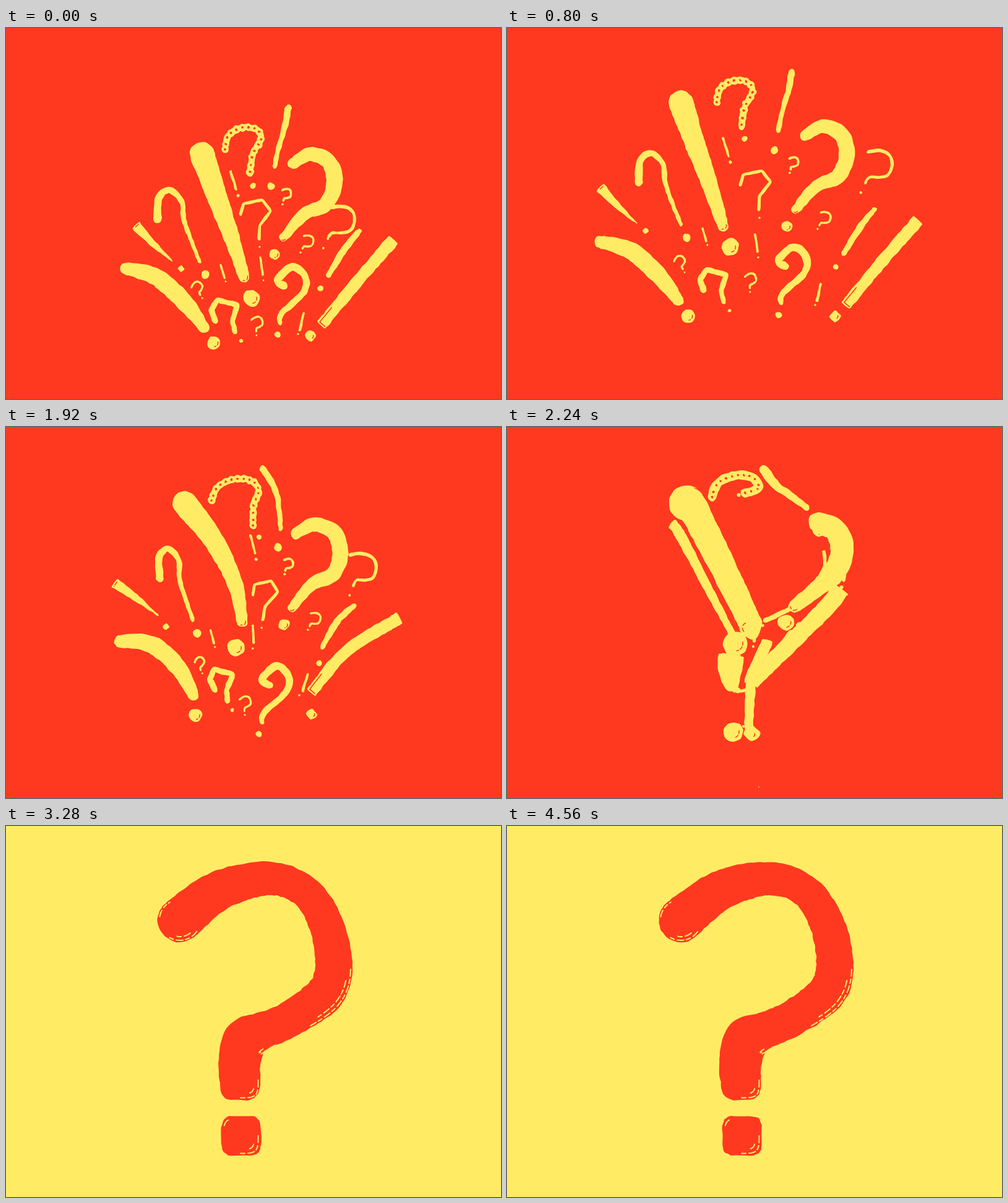
These frames come from a looping animation (800x600 px, 4640 ms). An HTML page with a canvas:

```html
<!DOCTYPE html>
<html lang="en">
<head>
<meta charset="utf-8">
<title>Questions</title>
<style>
html, body { margin: 0; width: 100%; height: 100%; overflow: hidden; background: #ff3920; }
canvas { display: block; width: 100vw; height: 100vh; }
</style>
</head>
<body>
<canvas id="stage" width="800" height="600"></canvas>
<script>
const RED = '#ff3920', YELLOW = '#ffec64';
const LOOP = 4640, STEP = 80, POP = 2320, H = Math.PI / 2;
const ctx = document.getElementById('stage').getContext('2d');
ctx.lineCap = ctx.lineJoin = 'round';

const parse = s => s.split(' ').map(p => p.split(',').map(Number));
const mix = (a, b, k) => a + (b - a) * k;
const clamp = (v, lo, hi) => Math.min(hi, Math.max(lo, v));

let seed = 1;
function rand() {
  seed = (seed + 0x6d2b79f5) | 0;
  let z = Math.imul(seed ^ (seed >>> 15), 1 | seed);
  z = (z + Math.imul(z ^ (z >>> 7), 61 | z)) ^ z;
  return ((z ^ (z >>> 14)) >>> 0) / 4294967296;
}

// Linear interpolation through [time, value] pairs
function keys(t, list) {
  for (let i = 1; i < list.length; i++) {
    const [t0, v0] = list[i - 1], [t1, v1] = list[i];
    if (t <= t1) return mix(v0, v1, clamp((t - t0) / (t1 - t0), 0, 1));
  }
  return list[list.length - 1][1];
}

function spline(a, b, c, d, u) {
  const cubic = 3 * (b - c) + d - a;
  const square = 2 * a - 5 * b + 4 * c - d;
  return b + .5 * u * (c - a + u * (square + u * cubic));
}

// Dense points along a smooth or straight-sided path
function sample(pts, straight, gap = 5) {
  const out = [], last = pts.length - 1;
  const at = i => pts[clamp(i, 0, last)];
  for (let i = 0; i < last; i++) {
    const [a, b, c, d] = [at(i - 1), at(i), at(i + 1), at(i + 2)];
    const m = Math.max(2, Math.round(Math.hypot(c[0] - b[0], c[1] - b[1]) / gap));
    for (let j = 0; j < m; j++) {
      const u = j / m;
      out.push(b.map((v, q) => straight ? mix(v, c[q], u) : spline(a[q], v, c[q], d[q], u)));
    }
  }
  out.push(pts[last]);
  return out;
}

// Fill a closed outline with a shaky hand-cut edge
function fillRough(pts, amp, color) {
  const p = pts.map(([x, y]) => [x + (rand() * 2 - 1) * amp, y + (rand() * 2 - 1) * amp]);
  ctx.beginPath();
  for (let i = 0; i <= p.length; i++) {
    const a = p[i % p.length], b = p[(i + 1) % p.length];
    const mx = (a[0] + b[0]) / 2, my = (a[1] + b[1]) / 2;
    if (i) ctx.quadraticCurveTo(a[0], a[1], mx, my);
    else ctx.moveTo(mx, my);
  }
  ctx.fillStyle = color;
  ctx.fill();
}

function line(pts, width, color, dash = []) {
  ctx.setLineDash(dash);
  ctx.lineWidth = width;
  ctx.strokeStyle = color;
  ctx.beginPath();
  pts.forEach(p => ctx.lineTo(p[0], p[1]));
  ctx.stroke();
  ctx.setLineDash([]);
}

// Arc points; a power below 1 squares the circle off
function arc(x, y, r, from, to, n = 8, power = 1, turn = 0) {
  const bulge = v => Math.sign(v) * Math.abs(v) ** power;
  return Array.from({ length: n + 1 }, (_, i) => {
    const a = mix(from, to, i / n), u = r * bulge(Math.cos(a)), v = r * bulge(Math.sin(a));
    return [x + u * Math.cos(turn) - v * Math.sin(turn), y + u * Math.sin(turn) + v * Math.cos(turn)];
  });
}

function heading(s, i) {
  const a = s[Math.max(0, i - 1)], b = s[Math.min(s.length - 1, i + 1)];
  return Math.atan2(b[1] - a[1], b[0] - a[0]);
}

// Point beside the path, positive to the left of its heading
function beside(s, i, q) {
  const h = heading(s, i);
  return [s[i][0] + q * Math.sin(h), s[i][1] - q * Math.cos(h)];
}

function limb(s, color, amp, square) {
  const last = s.length - 1;
  const left = s.map((p, i) => beside(s, i, p[2]));
  const right = s.map((p, i) => beside(s, i, -p[2])).reverse();
  const cap = (i, turn) => {
    const [x, y, r] = s[i];
    return square ? [] : arc(x, y, r, -H, H, Math.max(4, Math.round(r / 1.5)), 1, turn).slice(1, -1);
  };
  fillRough([...left, ...cap(last, heading(s, last)), ...right, ...cap(0, heading(s, 0) + Math.PI)], amp, color);
}

// Middle line of the big question mark: x, y, half width
const spine = parse('281,152,36 345,104,32 425,85,27 483,106,26 517,158,28 530,225,30 515,272,31 457,313,29 415,331,30 386,347,36 377,385,34 378,411,33');
const big = sample(spine);

// Small question mark with its dot at x, y
function query(x, y, height, angle) {
  const k = height / 414, c = Math.cos(angle) * k, s = Math.sin(angle) * k;
  return [...spine, [380, 500]].map(([px, py]) => {
    const u = px - 380, v = py - 500;
    return [x + u * c - v * s, y + u * s + v * c];
  });
}

// Nearest place on the big mark
function gather([x, y]) {
  const far = p => Math.hypot(p[0] - x, p[1] - y);
  const p = [...big, [380, 500]].reduce((a, b) => far(b) < far(a) ? b : a);
  const k = Math.min(1, 16 / (far(p) || 1));
  return [mix(p[0], x, k), mix(p[1], y, k)];
}

const marks = [];

// pts: path, dot last; radii: start, end, dot; from: inward shift at the start;
// sway: sideways shift of head and dot, vertical shift, bow
function mark(pts, radii, from, sway, opt = {}) {
  const p = typeof pts === 'string' ? parse(pts) : pts;
  const n = p.length - 1, a = p[0], z = p[n];
  const pull = x => (410 - x) * .13;
  const [head, foot, drop, bow] = sway || [pull(a[0]), pull(z[0]), 0, 0];
  const bent = p.map(([x, y], i) => {
    const f = i / n, b = (bow || 0) * 4 * f * (1 - f);
    return [x + mix(head, foot, f) + b * (z[1] - a[1]), y + drop - b * (z[0] - a[0])];
  });
  const width = i => i === n ? radii[2] :
    mix(radii[0], radii[1], i / (n - 1)) + (opt.belly || 0) * Math.sin(Math.PI * i / (n - 1));
  marks.push({ p, bent, joined: bent.map(gather), r: p.map((_, i) => width(i)), from, ...opt });
}

mark('281,121 305,190 330,260 349,320 361,354', [20, 9, 14], [36, 83], [5, 8, -4, .13], { shine: true });
mark('151,346 200,360 245,400 277,441 293,466', [10, 9, 11], [43, 43], [30, 10, -3, .08], { belly: 5 });
mark('213,250 215,215 232,202 252,220 257,255 281,318 290,339', [6.5, 3, 7], [32, 60], [33, 16, -10]);
mark('150,257 180,289 210,316 224,328', [8.5, 1, 4.5], [59, 61], [20, 30, -10, .08], { square: true, tick: true });
mark('339,120 345,97 367,85 390,88 397,104 384,128 379,160 384,179', [5, 5, 5], [15, 76], [-8, 24, -7], { chain: true });
mark('460,71 455,100 445,135 438,166 432,198', [5.5, 3.5, 7], [-4, 58], [-45, 8, -8, .12]);
mark('482,174 510,159 540,172 549,205 535,240 500,256 466,294 452,321', [9, 7, 9], [-18, 45], [-12, -1, -5], { belly: 5, shine: true });
mark(query(572, 266, 76, .46), [3, 2, 2.5], [-59, 90], [-23, -12, -1]);
mark('594,293 570,323 544,365 531,386', [4, 4, 5], [-23, 35], [-30, -23, -7, -.07], { belly: 1.5 });
mark('665,310 604,380 547,449 530,466', [10, 9, 8], [-38, 32], [-25, -33, -4, -.15], { square: true, bracket: true });
mark('450,385 438,376 463,354 483,370 481,395 445,430 443,445 439,464', [6, 4, 5.5], [0, 32], [-24, -30, 30], { belly: 1 });
mark('318,424 312,407 322,391 354,399 346,425 350,443 360,457', [5, 4, 3.5], [20, 49], [18, 4, -3], { straight: true });
mark('377,254 382,237 412,231 426,249 408,272 407,294 408,307', [2.5, 2.5, 2], [2, 47], [22, 5, 14], { straight: true });
mark('349,178 358,207 361,217', [2.2, 2, 3], [14, 54], [45, 42, -7]);
mark('401,334 405,362 406,371', [1.8, 2, 1.8], [10, 37], [-3, -8, -16]);
mark('316,324 322,345 324,351', [1.6, 1.9, 1.8], [31, 59]);
mark('507,414 501,441 498,448', [1.8, 2.4, 2], [-26, 47], [-17, -22, -18]);
mark(query(393, 427, 30, -.05), [1.7, 1.7, 1.7], [12, 70], [-8, -8, 33]);
mark(query(287, 395, 28, -.5), [1.7, 1.7, 1.7], [30, 42], [33, 28, 0]);
mark(query(457, 234, 26, .25), [1.9, 1.9, 2.2], [-10, 51]);
mark(query(502, 325, 31, .48), [1.8, 1.7, 1.8], [-26, 38]);

const spread = [[0, 1], [80, .52], [160, .2], [240, .02], [400, -.08], [560, -.08], [800, 0], [1680, .08]];
const bend = [[1680, 0], [1760, .14], [1920, 1]];
const join = [[1920, 0], [2000, .2], [2240, 1]];

function drawDot(x, y, r, square) {
  const n = square ? 12 : Math.max(6, Math.round(r * 1.2));
  fillRough(arc(x, y, r, 0, Math.PI * 2, n, square ? .5 : 1, .8).slice(1), Math.min(1.3, r * .16), YELLOW);
  if (r > 7.5) line(arc(x, y, r * .6, -.2, 1.4), 1.5, RED, [5, 3]);
}

function drawMark(m, t) {
  const k = keys(t, spread), w = keys(t, bend), j = keys(t, join);
  const place = (i, q) => mix(mix(m.p[i][q] , m.bent[i][q], w) + m.from[q] * k, m.joined[i][q], j);
  const pose = m.p.map((_, i) => [place(i, 0), place(i, 1), m.r[i] * (1 + j * .45)]);
  const dot = pose.pop();
  const s = sample(pose, m.straight), n = s.length - 1;
  limb(s, YELLOW, Math.min(.9, Math.max(...m.r) * .2), m.square);
  drawDot(...dot, m.square);
  if (m.chain) {
    const links = s.filter((_, i) => i % 2 === 0);
    links.forEach(p => fillRough(arc(p[0], p[1], 6.8, 0, 5.4, 6), 1, YELLOW));
    links.forEach(p => fillRough(arc(p[0], p[1], 2.2, 0, 5, 5), .7, RED));
  }
  if (m.shine) line(arc(s[n][0], s[n][1], s[n][2] * .62, -1.6, .6, 8, 1, heading(s, n)), 1.5, RED, [6, 4]);
  if (m.tick) line([beside(s, 1, 4), beside(s, 1, -5)], 1.6, RED, [6, 3]);
  if (m.bracket) line([beside(s, n - 1, 6), beside(s, n - 1, -5), beside(s, n - 8, -5)], 1.6, RED);
}

const pop = [[2320, .94], [2400, 1.085], [2640, 1]];

function drawBig(t) {
  const k = keys(t, pop), turn = Math.PI * 2;
  const shine = pts => line(pts, 2, YELLOW, [11, 5, 7, 4]);
  const rim = (from, to, inset) => {
    const n = big.length - 1, pts = [];
    for (let i = Math.round(n * from); i <= n * to; i++) pts.push(beside(big, i, big[i][2] - inset));
    shine(pts);
  };
  ctx.save();
  ctx.translate(362, 303);
  ctx.scale(k, k);
  ctx.translate(-362, -303);
  limb(big, RED, 1, true);
  fillRough(arc(281, 152, 36, 0, turn, 44).slice(1), 1, RED);
  fillRough(arc(378, 411, 32.5, 0, turn, 44, .6).slice(1), 1, RED);
  fillRough(arc(380, 501, 32, 0, turn, 44, .45).slice(1), 1, RED);
  rim(.575, .73, 3);
  rim(.6, .7, 9);
  rim(.85, .91, 4);
  shine(arc(281, 152, 33, .6, 2.1));
  shine(arc(281, 152, 27, .9, 1.8));
  shine(arc(281, 152, 33, 3.3, 4.2));
  for (const y of [411, 501]) {
    shine(arc(379, y, 28.5, 0, H, 12, .5));
    shine(arc(379, y, 22, .4, 1.1, 8, .5));
  }
  shine(arc(380, 501, 28, 3.5, 4.3, 8, .5));
  ctx.restore();
}

const tail = [[2320, .15], [2400, 0], [2480, .5], [2640, 1]];
const tip = [[2320, .35], [2400, 1], [2640, 1.08]];

// Eight rays, longest sideways and shortest on the diagonals
function drawRays(t) {
  if (t >= 2640) return;
  ctx.save();
  ctx.shadowColor = '#fff';
  ctx.shadowBlur = 9;
  for (let i = 0; i < 8; i++) {
    const c = Math.cos(i * H / 2), s = Math.sin(i * H / 2);
    const near = i % 2 ? 31 : 88 + 19 * Math.abs(c), far = i % 2 ? 232 : 272 + 68 * Math.abs(c);
    const from = mix(near, far, keys(t, tail)), to = mix(near, far, keys(t, tip));
    const n = Math.ceil((to - from) / 6);
    line(Array.from({ length: n + 1 }, (_, q) => {
      const r = mix(from, to, q / n), e = rand() - .5;
      return [400 + r * c - e * s, 298 + r * s + e * c];
    }), 6.5, '#fff');
  }
  ctx.restore();
}

function draw(t) {
  const late = t >= POP;
  seed = t * 7 + 11;
  ctx.fillStyle = late ? YELLOW : RED;
  ctx.fillRect(0, 0, 800, 600);
  if (late) {
    drawBig(t);
    drawRays(t);
  } else {
    marks.forEach(m => drawMark(m, t));
  }
  // A speck of dust now and then
  if (rand() < .4) {
    ctx.fillStyle = '#fff6b8';
    ctx.fillRect(rand() * 800, rand() * 600, 1.5, 1.5);
  }
}

const start = performance.now();
let shown = -1;
function tick() {
  const t = Math.floor(((performance.now() - start + 1) % LOOP) / STEP) * STEP;
  if (t !== shown) draw(shown = t);
  requestAnimationFrame(tick);
}
tick();
</script>
</body>
</html>
```
